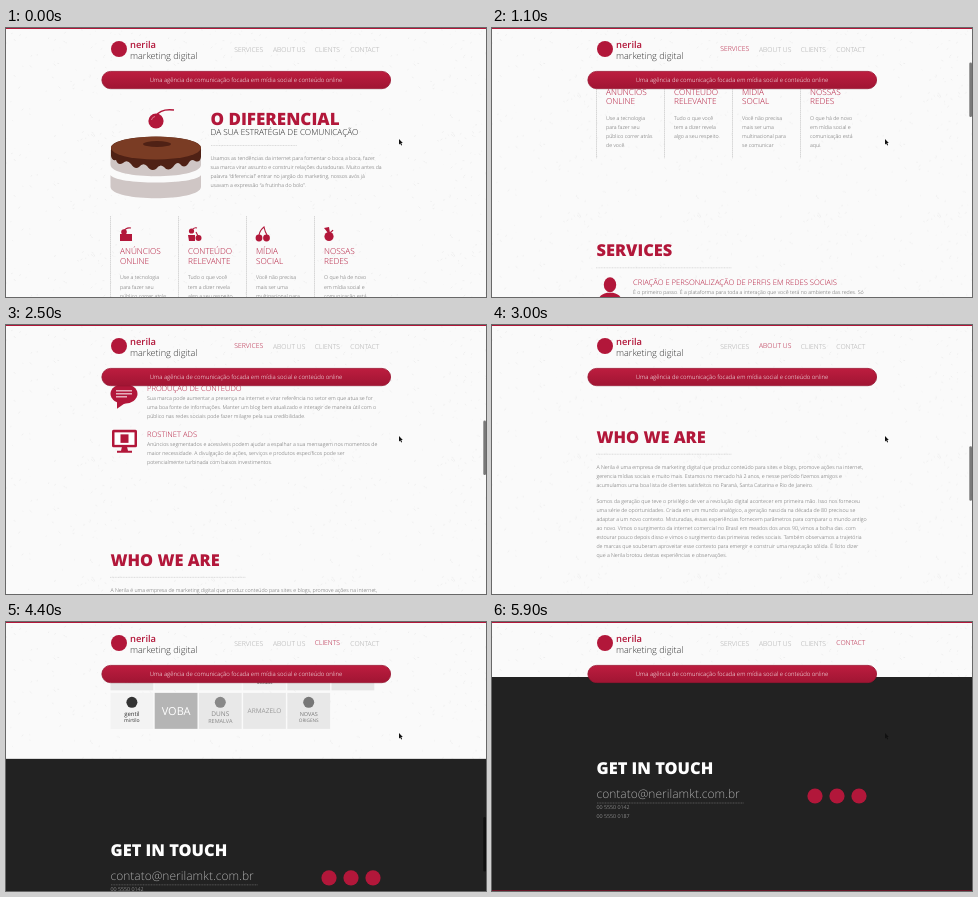
An HTML page that plays this animation: 480 by 269 pixels, repeating every 6000 ms.

```html
<!DOCTYPE html>
<html lang="pt">
<head>
<meta charset="utf-8">
<title>Nerila marketing digital</title>
<style>
html, body { margin: 0; width: 100%; height: 100%; overflow: hidden; background: #fafafa; }
svg { display: block; width: 100vw; height: 100vh; }
text { font-family: "Open Sans", sans-serif; font-weight: 300; text-rendering: geometricPrecision; }
</style>
</head>
<body>
<svg id="stage" viewBox="0 0 480 269"></svg>
<script>
const RED = '#b2173a', GREY = '#606060', CHOCOLATE = '#4f2115', BODY = 5.28;
const stage = document.getElementById('stage');

// y is the vertical middle of the capitals
const text = (x, y, str, size, fill, extra = '') =>
  `<text x="${x}" y="${y + size * 0.36}" font-size="${size}" fill="${fill}" ${extra}>${str}</text>`;
const lines = (x, y, rows, size = BODY, step = 9.1, fill = GREY) =>
  rows.map((row, i) => text(x, y + i * step, row, size, fill)).join('');
const rect = (x, y, w, h, fill, extra = '') =>
  `<rect x="${x}" y="${y}" width="${w}" height="${h}" fill="${fill}" ${extra}/>`;
const circle = (x, y, r, fill = RED) => `<circle cx="${x}" cy="${y}" r="${r}" fill="${fill}"/>`;
const ellipse = (x, y, rx, ry, fill = RED) => `<ellipse cx="${x}" cy="${y}" rx="${rx}" ry="${ry}" fill="${fill}"/>`;
const path = (d, fill = RED, extra = '') => `<path d="${d}" fill="${fill}" ${extra}/>`;
const stroke = (d, colour = RED, width = 1, extra = '') =>
  path(d, 'none', `stroke="${colour}" stroke-width="${width}" ${extra}`);
const at = (x, y, content) => `<g transform="translate(${x} ${y})">${content}</g>`;
const title = (y, str, fill = RED, x = 104.5, size = 16.4) => text(x, y, str, size, fill, 'style="font-weight:800"');
const divider = (x, y, w, colour = '#c4c4c4') => stroke(`M${x} ${y}h${w}`, colour, 0.6, 'stroke-dasharray="1 .6"');

function paperTexture() {
  let seed = 7, specks = '';
  const random = n => (seed = (seed * 16807) % 2147483647) / 2147483647 * n;
  for (let i = 0; i < 110; i++)
    specks += `M${random(120).toFixed(1)} ${random(120).toFixed(1)}l${(random(4) - 2).toFixed(1)} ${(random(4) - 2).toFixed(1)}`;
  return `<pattern id="paper" width="120" height="120" patternUnits="userSpaceOnUse">
    ${rect(0, 0, 120, 120, '#fafafa')}${stroke(specks, '#eeeeee', 0.9)}</pattern>`;
}

const cake =
  path('M104.500 147V159C106 174 194 174 195 159V147C190 157 110 157 104.500 147Z', '#cfc6c5') +
  path('M104.500 122V137C106 152 194 152 195 137V122Z', '#cfc6c5') +
  path('M105 120C105 105 195 105 195 120V129Q194 135 189 133Q185 130 182 136Q178 141 174 136Q171 133 167 139Q162 144 158 139Q154 135 150 141Q145 144 141 138Q137 134 133 139Q129 142 125 136Q121 131 117 135Q112 138 110 132Q106 133 105 128Z', CHOCOLATE) +
  ellipse(150, 120, 45, 11.5, '#7a3c24') + ellipse(151, 116, 14, 3, CHOCOLATE) +
  stroke('M150 88C153 83 160 81 168 82', RED, 1.5) +
  circle(150, 93, 7.6) + stroke('M145.500 92Q146 89 149 88.500', '#e2798d', 1);

const hero = cake + title(90.4, 'O DIFERENCIAL', RED, 204.5, 17) +
  text(204.5, 104, 'DA SUA ESTRATÉGIA DE COMUNICAÇÃO', 8.25, '#222') + divider(205, 117.5, 86) +
  lines(204.5, 130, [
    'Usamos as tendências da internet para fomentar o boca a boca, fazer',
    'sua marca virar assunto e construir relações duradouras. Muito antes da',
    'palavra “diferencial” entrar no jargão do marketing, nossos avós já',
    'usavam a expressão “a frutinha do bolo”.']);

const cardIcons = [
  rect(0, 7, 12, 7, RED) + circle(4, 5, 2.8) + stroke('M4 4Q6 0 11 1', RED, 1.2),
  circle(3.5, 4, 2.6) + path('M0 8H7V14H1Z') + circle(10.500, 11, 3) + stroke('M4 3Q6 0 9 1M10 9L8 5', RED, 1.1),
  circle(3, 11, 3.4) + circle(10.500, 11, 3.4) + stroke('M3 8Q4 3 8 0Q9 5 11 8', RED, 1.1),
  circle(5, 9.5, 4.6) + path('M4 6L0 1L5 0L6 6Z') + stroke('M5 6Q8 5 9 3', RED, 1.2)
];
const cards = [
  ['ANÚNCIOS', 'ONLINE', 'Use a tecnologia', 'para fazer seu', 'público correr atrás', 'de você.'],
  ['CONTEÚDO', 'RELEVANTE', 'Tudo o que você', 'tem a dizer revela', 'algo a seu respeito.'],
  ['MÍDIA', 'SOCIAL', 'Você não precisa', 'mais ser uma', 'multinacional para', 'se comunicar'],
  ['NOSSAS', 'REDES', 'O que há de novo', 'em mídia social e', 'comunicação está', 'aqui.']
].map(([a, b, ...rest], i) => {
  const x = 114 + i * 68;
  return stroke(`M${x - 9.5} 188V289.5`, '#c8c8c8', 0.7, 'stroke-dasharray="1.500 .4"') +
    at(x, 199, cardIcons[i]) + lines(x, 223.2, [a, b], 8.25, 9.5, RED) + lines(x, 249.5, rest);
}).join('');

const serviceIcons = [
  ellipse(118, 416, 6.2, 7.5) + path('M106.500 433Q106 426 115 424H121Q130 426 129.500 433Z'),
  rect(110, 464, 16.500, 26, RED, 'rx="2"') + rect(112, 467.500, 12.500, 17.500, '#fff') + circle(118.2, 487.5, 1.2, '#fff') +
    rect(113.5, 479, 2, 5, RED) + rect(117, 476, 2, 8, RED) + rect(120.5, 472, 2, 12, RED),
  ellipse(118, 521, 13.5, 10) + path('M111 528L111 536L121 529Z') +
    stroke('M110 518h16M110 521h16M110 524h11', '#fff', 1),
  rect(106, 557, 25, 17.500, RED, 'rx="1.500"') + rect(108.5, 559.5, 20, 12.5, '#fff') + rect(114.500, 561.500, 8, 8.5, RED) +
    path('M116 574H121L122 578H126V580H111V578H115Z')
];
const services = title(381.5, 'SERVICES') + divider(104, 399, 136) + [
  [413, 'CRIAÇÃO E PERSONALIZAÇÃO DE PERFIS EM REDES SOCIAIS',
    'É o primeiro passo. É a plataforma para toda a interação que você terá no ambiente das redes. Só',
    'com uma página bonita e funcional o resto do trabalho pode dar certo. A princípio parece simples,',
    'mas você ficaria surpreso ao conhecer todas as opções de personalização que uma página do',
    'Rostinet oferece.'],
  [469, 'GERENCIAMENTO DE REDES SOCIAIS',
    'É o trabalho mais cotidiano e ao mesmo tempo mais desafiador. O objetivo não é apenas',
    'aumentar a base instalada de seguidores, mas mantê-la satisfeita e bem informada. Lembre-se,',
    'toda mensagem que você passa diz algo sobre você.'],
  [515, 'PRODUÇÃO DE CONTEÚDO',
    'Sua marca pode aumentar a presença na internet e virar referência no setor em que atua se for',
    'uma boa fonte de informações. Manter um blog bem atualizado e interagir de maneira útil com o',
    'público nas redes sociais pode fazer milagre pela sua credibilidade.'],
  [561, 'ROSTINET ADS',
    'Anúncios segmentados e acessíveis podem ajudar a espalhar a sua mensagem nos momentos de',
    'maior necessidade. A divulgação de ações, serviços e produtos específicos pode ser',
    'potencialmente turbinada com baixos investimentos.']
].map(([y, head, ...rest], i) =>
  serviceIcons[i] + text(141, y, head, 7.6, RED) + lines(141, y + 10, rest)).join('');

const intro = [
  'A Nerila é uma empresa de marketing digital que produz conteúdo para sites e blogs, promove ações na internet,',
  'gerencia mídias sociais e muito mais. Estamos no mercado há 2 anos, e nesse período fizemos amigos e',
  'acumulamos uma boa lista de clientes satisfeitos no Paraná, Santa Catarina e Rio de Janeiro.'];
const about = title(687, 'WHO WE ARE') + divider(104, 704.5, 136) + lines(104.4, 717.5, intro) +
  lines(104.4, 751, [
    'Somos da geração que teve o privilégio de ver a revolução digital acontecer em primeira mão. Isso nos forneceu',
    'uma série de oportunidades. Criada em um mundo analógico, a geração nascida na década de 80 precisou se',
    'adaptar a um novo contexto. Misturadas, essas experiências fornecem parâmetros para comparar o mundo antigo',
    'ao novo. Vimos o surgimento da internet comercial no Brasil em meados dos anos 90, vimos a bolha das .com',
    'estourar pouco depois disso e vimos o surgimento das primeiras redes sociais. Também observamos a trajetória',
    'de marcas que souberam aproveitar esse contexto para emergir e construir uma reputação sólida. É lícito dizer',
    'que a Nerila brotou destas experiências e observações.']);

// name, second line, tile, ink, size, has a mark
const clients = title(898, 'SELECTED CLIENTS') + divider(104, 915.5, 136) + lines(104.4, 929, intro) + [
  ['gentil', 'mirtilo', '#e6e6e6', '#999', 5.5, 1],
  ['vertrilo', 'logistics', '#f3f3f3', '#444', 6, 0],
  ['SALÃO VIDELA', 'cabelos e estética', '#f3f3f3', '#555', 4.2, 1],
  ['Paiolim', 'Modas', '#f0f0f0', '#555', 6, 1],
  ['Nivalda', 'Trel', '#e6e6e6', '#999', 6.5, 0],
  ['TIBRA', '', '#e6e6e6', '#aaa', 7, 1],
  ['gentil', 'mirtilo', '#f3f3f3', '#333', 6, 1],
  ['VOBA', '', '#b5b5b5', '#fff', 11, 0],
  ['DUNS', 'REMALVA', '#e8e8e8', '#888', 6.5, 1],
  ['ARMAZELO', '', '#e8e8e8', '#999', 6.5, 0],
  ['NOVAS', 'ORIGENS', '#e8e8e8', '#777', 5.5, 1]
].map(([name, more, tile, ink, size, mark], i) => {
  const style = 'text-anchor="middle" style="font-weight:400"', y = mark ? 21 : more ? 14.5 : 18;
  return at(104.5 + i % 6 * 44.2, 960.5 + Math.floor(i / 6) * 38.5,
    rect(0, 0, 42.8, 36, tile) + (mark ? circle(21.4, 9.5, 5.5, ink) : '') +
    text(21.4, y, name, size, ink, style) + text(21.4, y + size * 1.1, more, size * 0.85, ink, style));
}).join('');

const contact = rect(0, 1065, 480, 214, '#222') + rect(0, 1278, 480, 1, '#651527') +
  title(1156, 'GET IN TOUCH', '#fff') + text(104.5, 1182, 'contato@nerilamkt.com.br', 12, '#aaa') +
  divider(105, 1191, 147, '#777') +
  lines(104.5, 1195, ['00 5550 0142', '00 5550 0187'], 5.3, 9, '#bbb') +
  [323, 345, 367].map(x => circle(x, 1184, 7.6)).join('');

// label, x, scroll offset where the section becomes current
const nav = [['SERVICES', 228.3, 156], ['ABOUT US', 267, 462], ['CLIENTS', 308.7, 673], ['CONTACT', 344.3, 931]];
const header = rect(0, 0, 480, 53, 'url(#paper)') + rect(0, 0, 480, 1, RED) +
  circle(113, 21, 8) + text(124, 16.2, 'nerila', 9.4, RED, 'style="font-weight:600"') +
  text(124, 27.5, 'marketing digital', 9.1, '#333') +
  nav.map(([label, x]) => text(x, 22, label, 6.8, '#a8a8a8', 'class="nav"')).join('') +
  rect(95.5, 43.5, 289.5, 18, '#000', 'rx="9" opacity=".1"') +
  rect(95.9, 43.4, 288.7, 17.2, 'url(#ribbon)', 'rx="8.600" stroke="#9c1532" stroke-width=".8"') +
  text(240, 52.2, 'Uma agência de comunicação focada em mídia social e conteúdo online', 5.98, '#fff', 'text-anchor="middle"');

stage.innerHTML = `<defs>${paperTexture()}
  <linearGradient id="ribbon" x2="0" y2="1"><stop stop-color="#bd1d3f"/><stop offset="1" stop-color="#a01533"/></linearGradient></defs>
  <g id="page">${rect(0, 0, 480, 1279, 'url(#paper)')}${hero}${cards}${services}${about}${clients}${contact}</g>
  ${header}${rect(477.3, 0, 2.7, 54.5, '#000', 'id="thumb" rx="1.300"')}
  ${path('M393 111V116.500L394.300 115.400L395.200 117.500L396.100 117.100L395.200 115.100H396.800Z', '#111')}`;

const page = document.getElementById('page');
const thumb = document.getElementById('thumb');
const labels = [...document.querySelectorAll('.nav')];

// scroll path: [ms, offset], joined by Hermite curves
const keys = [[400, 0], [1100, 159], [1900, 320], [3000, 575], [3700, 787], [4400, 928], [5200, 1010]];
const speed = i => (keys[i + 1][1] - keys[i][1]) / (keys[i + 1][0] - keys[i][0]);
const slope = i => i === 0 || i === keys.length - 1 ? 0 : (speed(i - 1) + speed(i)) / 2;

function scrollAt(t) {
  if (t <= keys[0][0]) return 0;
  const i = keys.findIndex(key => key[0] > t) - 1;
  if (i < 0) return keys[keys.length - 1][1];
  const [t0, y0] = keys[i], [t1, y1] = keys[i + 1];
  const d = t1 - t0, u = (t - t0) / d, v = 1 - u;
  return y0 * v * v * (1 + 2 * u) + y1 * u * u * (3 - 2 * u) + d * u * v * (slope(i) * v - slope(i + 1) * u);
}

function draw(now) {
  const t = now % 6000, y = scrollAt(t);
  page.setAttribute('transform', `translate(0 ${-y})`);
  thumb.setAttribute('y', 1.2 + y * 267 / 1279);
  thumb.setAttribute('opacity', t < 400 ? 0 : 0.52 * Math.max(0, Math.min(1, (5600 - t) / 250)));
  const current = nav.filter(item => y >= item[2]).length - 1;
  labels.forEach((label, i) => {
    label.setAttribute('fill', i === current ? RED : '#a8a8a8');
    label.setAttribute('transform', `translate(0 ${i === current ? -1.2 : 0})`);
  });
  requestAnimationFrame(draw);
}
draw(performance.now());
</script>
</body>
</html>
```
